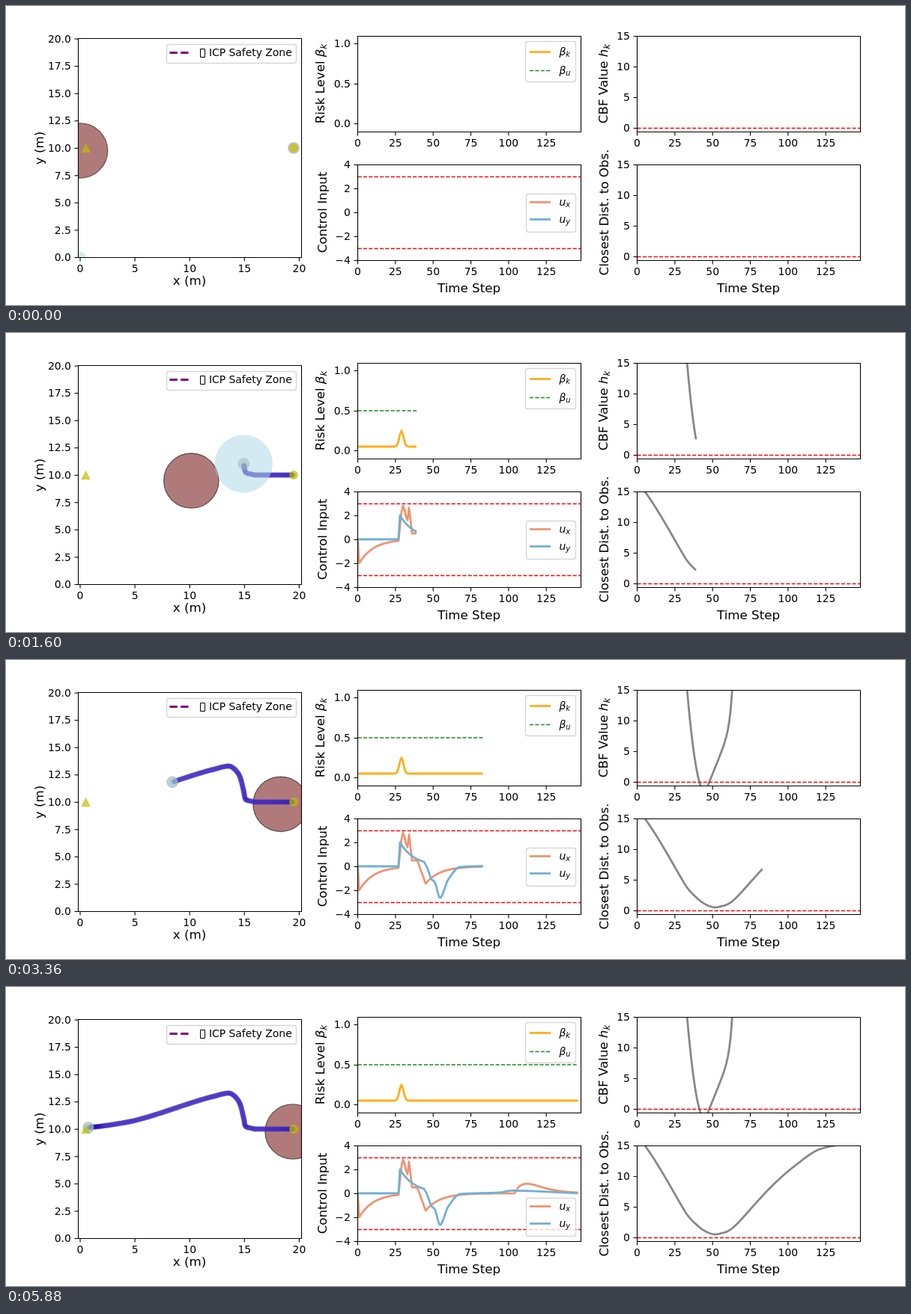
Recreate the animation shown at these times as an HTML page with a canvas. Size 1200 by 400 pixels, loop 5920 ms.

```html
<!DOCTYPE html>
<html lang="en">
<head>
<meta charset="utf-8">
<title>Collision avoidance run</title>
<style>
  html, body { margin: 0; width: 100%; height: 100%; overflow: hidden; background: #fff; }
  canvas { display: block; }
</style>
</head>
<body>
<canvas id="stage" width="1200" height="400"></canvas>
<script>
const ctx = document.getElementById('stage').getContext('2d');
const STEP_MS = 40, STEPS = 148, STEP_PX = 298 / STEPS, METRE = 14.62;
const FONT = '"DejaVu Sans", sans-serif';
const SMALL = 13.89, LARGE = 16.67, THIN = 1.39, THICK = 2.78;
const DASH = [5.14, 2.22];
const CORAL = '#ef9473', BLUE = '#71b0d2', ORANGE = '#ffae1a', GREEN = '#1a8d1a', GRAY = '#888';

const range = (n, fn) => Array.from({ length: n }, (_, i) => fn(i));

// Monotone cubic curve through [step, value] knots.
function curve(...knots) {
  const slope = i => (knots[i + 1][1] - knots[i][1]) / (knots[i + 1][0] - knots[i][0]);
  const tangents = knots.map((_, i) => {
    if (i === 0) return slope(0);
    if (i === knots.length - 1) return slope(i - 1);
    const a = slope(i - 1), b = slope(i);
    return a * b > 0 ? 2 * a * b / (a + b) : 0;
  });
  return t => {
    const i = Math.max(0, knots.findIndex(k => k[0] >= t) - 1);
    const [t0, v0] = knots[i], [t1, v1] = knots[i + 1];
    const h = t1 - t0, u = (t - t0) / h, w = 1 - u;
    return v0 * (1 + 2 * u) * w * w + v1 * u * u * (3 - 2 * u)
      + h * u * w * (tangents[i] * w - tangents[i + 1] * u);
  };
}

// The obstacle crosses at constant speed, then settles at the right edge.
function obstacleX(k) {
  const s = k / 76.5;
  return 99 + 284 * s / (1 + s ** 7) ** (1 / 7);
}
const obstacleY = curve([0, 193.5], [19, 193.5], [45, 198], [104, 191], [122, 198], [147, 193.5]);

// The robot speeds up, swerves over the obstacle and eases into its goal.
const SWERVE = [[28, 332, 190], [34, 319.8, 186.3], [40, 317.2, 175], [49, 311, 153.5],
  [57, 297, 142], [66, 274.5, 147], [104, 165.5, 180], [122, 126.3, 186.3], [147, 110, 188]];
const swerveX = curve(...SWERVE.map(([k, x]) => [k, x]));
const swerveY = curve(...SWERVE.map(([k, x, y]) => [k, y]));
const robotX = k => k < 28 ? 384 - 2.8 * (k - 10 * (1 - Math.exp(-k / 10))) : swerveX(k);
const robotY = k => k < 28 ? 190 : swerveY(k);

const offset = k => [robotX(k) - obstacleX(k), robotY(k) - obstacleY(k)];
const distance = k => Math.hypot(...offset(k)) / METRE - 3;

// The zone grows with relative speed while the two approach each other.
function zoneRadius(k) {
  if (distance(k) >= distance(k - 1)) return 7.3;
  const [x0, y0] = offset(k - 1), [x1, y1] = offset(k);
  return 7.3 + 6.6 * Math.hypot(x1 - x0, y1 - y0);
}

const decay = (from, k) => from * Math.exp(-k / 9.5);
const risk = k => .05 + .2 * Math.exp(-(((k - 29) / 1.9) ** 2));

const evadeX = curve([27, -.13], [30, 2.8], [33, 1.6], [34, 2.65], [36, .5], [39, .5], [42, -.4], [45, -1.45]);
function controlX(k) {
  if (k < 1) return 0;
  if (k < 27) return decay(-2, k - 1);
  if (k < 45) return evadeX(k);
  if (k <= 104) return decay(-1.45, k - 45);
  const u = (k - 104) / 8;
  return .8 * u * Math.exp(1 - u);
}

const returnY = curve([44, .37], [46, -.1], [49, -1.1], [51, -1.3], [54.5, -2.65], [60, -1.1],
  [68, -.05], [94, .07], [102, .22], [147, 0]);
const controlY = k => k < 28 ? 0 : k < 44 ? decay(2, k - 28) : returnY(k);

function barrier(k) {
  const u = k - 45;
  return -1.6 + (u < 0 ? .117 * u * u : .6 * u + Math.exp((u - 15) / 1.7));
}

function text(str, x, y, align = 'center', size = SMALL) {
  ctx.font = `${size}px ${FONT}`;
  ctx.fillStyle = '#000';
  ctx.textAlign = align;
  ctx.fillText(str, x, y);
}

// "plain|italic|subscript"
function formula(str, x, y, size, centered) {
  const runs = str.split('|').map((s, i) => {
    const font = `${i ? 'italic ' : ''}${i === 2 ? size * .7 : size}px ${FONT}`;
    ctx.font = font;
    return { s, font, width: ctx.measureText(s).width, drop: i === 2 ? size * .16 : 0 };
  });
  if (centered) x -= runs.reduce((sum, r) => sum + r.width, 0) / 2;
  ctx.textAlign = 'left';
  ctx.fillStyle = '#000';
  for (const r of runs) {
    ctx.font = r.font;
    ctx.fillText(r.s, x, y + r.drop);
    x += r.width;
  }
}

function verticalLabel(str, x, y) {
  ctx.save();
  ctx.translate(x, y);
  ctx.rotate(-Math.PI / 2);
  formula(str, 0, 0, LARGE, true);
  ctx.restore();
}

function line(points, color, width, dash = []) {
  ctx.beginPath();
  points.forEach(([x, y]) => ctx.lineTo(x, y));
  ctx.strokeStyle = color;
  ctx.lineWidth = width;
  ctx.lineJoin = 'round';
  ctx.setLineDash(dash);
  ctx.stroke();
  ctx.setLineDash([]);
}

function disc(x, y, r, fill, edge) {
  ctx.beginPath();
  ctx.arc(x, y, r, 0, 7);
  ctx.fillStyle = fill;
  ctx.fill();
  if (!edge) return;
  ctx.strokeStyle = edge;
  ctx.lineWidth = THIN;
  ctx.stroke();
}

function legendBox(x, y, w, h) {
  ctx.beginPath();
  ctx.roundRect(x, y, w, h, 3);
  ctx.fillStyle = 'rgba(255,255,255,.8)';
  ctx.fill();
  ctx.strokeStyle = 'rgba(204,204,204,.8)';
  ctx.lineWidth = THIN;
  ctx.stroke();
}

function clipped(x, y, w, h, draw) {
  ctx.save();
  ctx.beginPath();
  ctx.rect(x, y, w, h);
  ctx.clip();
  draw();
  ctx.restore();
}

function axes(left, top, w, h, xTicks, yTicks) {
  ctx.strokeStyle = '#000';
  ctx.lineWidth = 1.1;
  ctx.strokeRect(left, top, w, h);
  const bottom = top + h;
  for (const [x, label] of xTicks) {
    line([[x, bottom], [x, bottom + 5]], '#000', 1.1);
    text(label, x, bottom + 19.5);
  }
  for (const [y, label] of yTicks) {
    line([[left, y], [left - 5, y]], '#000', 1.1);
    text(label, left - 9.7, Math.round(y + 4.7), 'right');
  }
}

function chart(left, top, low, high, ticks, decimals, series, limits, count) {
  const xAt = k => left + k * STEP_PX;
  const yAt = v => top - .5 + 128 * (high - v) / (high - low);
  const snapped = v => Math.floor(yAt(v)) + .5;
  clipped(left, top, 298, 128, () => {
    for (const [fn, color, width, dash] of series) {
      line(range(count, k => [xAt(k), yAt(fn(k))]), color, width, dash);
    }
    for (const v of limits) line([[left, snapped(v)], [left + 298, snapped(v)]], '#f00', THIN, DASH);
  });
  axes(left, top, 298, 128,
    range(6, i => [xAt(25 * i), 25 * i]),
    ticks.map(v => [snapped(v), v.toFixed(decimals).replace('-', '\u2212')]));
}

function drawScene(k) {
  clipped(96.5, 43.5, 298, 293, () => {
    disc(obstacleX(k), obstacleY(k), 36.6, '#b17a7a', '#665558');
    const trail = range(k, i => [robotX(i + 1), robotY(i + 1)]);
    line(trail, 'rgba(80,60,205,.85)', 7);
    for (const [x, y] of trail) disc(x, y, 3, 'rgba(30,0,160,.18)');
    const x = robotX(k), y = robotY(k), zone = 'rgba(173,216,230,.53)';
    disc(x, y, 7.3, 'rgba(128,128,128,.42)', 'rgba(128,128,128,.3)');
    if (k) disc(x, y, zoneRadius(k), zone);
    else disc(99, 336.5, 7.3, zone);

    const goal = 'rgba(191,191,0,.7)';
    disc(384, 190, 6, goal);
    ctx.beginPath();
    ctx.moveTo(106.5, 183.5);
    ctx.lineTo(112.8, 196.3);
    ctx.lineTo(100.2, 196.3);
    ctx.fillStyle = goal;
    ctx.fill();
  });
  axes(96.5, 43.5, 298, 293,
    range(5, i => [99 + 5 * i * METRE, 5 * i]),
    range(9, i => [336.5 - 2.5 * i * METRE, (2.5 * i).toFixed(1)]));
  text('x (m)', 245, 373, 'center', LARGE);
  verticalLabel('y (m)', 50, 190);

  legendBox(214.5, 51.5, 173, 25);
  line([[218.5, 62.5], [246.5, 62.5]], '#800080', THICK, [10.3, 4.4]);
  ctx.strokeStyle = '#000';
  ctx.lineWidth = 1;
  ctx.strokeRect(259.5, 57.5, 6, 11);
  text('ICP Safety Zone', 271, 67, 'left');
}

function legend(y, rows) {
  for (const [drop, label, color, width, dash] of rows) {
    line([[699, y + drop], [727, y + drop]], color, width, dash);
    formula(label, 738.5, y + drop + 4.5, SMALL);
  }
}

function draw(k) {
  ctx.fillStyle = '#fff';
  ctx.fillRect(0, 0, 1200, 400);
  drawScene(k);

  chart(469.5, 40.5, -.1, 1.1, [0, .5, 1], 1,
    [[risk, ORANGE, THICK], [() => .5, GREEN, THIN, DASH]], [], k);
  verticalLabel('Risk Level |β|k', 425, 104);
  legendBox(693.5, 47.5, 67, 54);
  legend(61.5, [[0, '|β|k', ORANGE, THICK], [25, '|β|u', GREEN, THIN, DASH]]);

  chart(469.5, 212.5, -4, 4, [-4, -2, 0, 2, 4], 0,
    [[controlX, CORAL, THICK], [controlY, BLUE, THICK]], [3, -3], k);
  verticalLabel('Control Input', 428, 276);
  // The legend makes way once the curves reach it.
  const legendTop = k < 113 ? 251.5 : 282.5;
  legendBox(694.5, legendTop, 66, 51);
  legend(legendTop + 11, [[0, '|u|x', CORAL, THICK], [23, '|u|y', BLUE, THICK]]);

  const ticks = [0, 5, 10, 15];
  chart(842.5, 40.5, -.5, 15, ticks, 0, [[barrier, GRAY, THICK]], [0], k);
  verticalLabel('CBF Value |h|k', 803, 104);
  chart(842.5, 212.5, -.5, 15, ticks, 0, [[distance, GRAY, THICK]], [0], k);
  verticalLabel('Closest Dist. to Obs.', 804, 276);

  text('Time Step', 618, 383, 'center', LARGE);
  text('Time Step', 991, 383, 'center', LARGE);
}

function tick() {
  draw(Math.floor(performance.now() / STEP_MS) % STEPS);
  requestAnimationFrame(tick);
}
tick();
</script>
</body>
</html>
```
